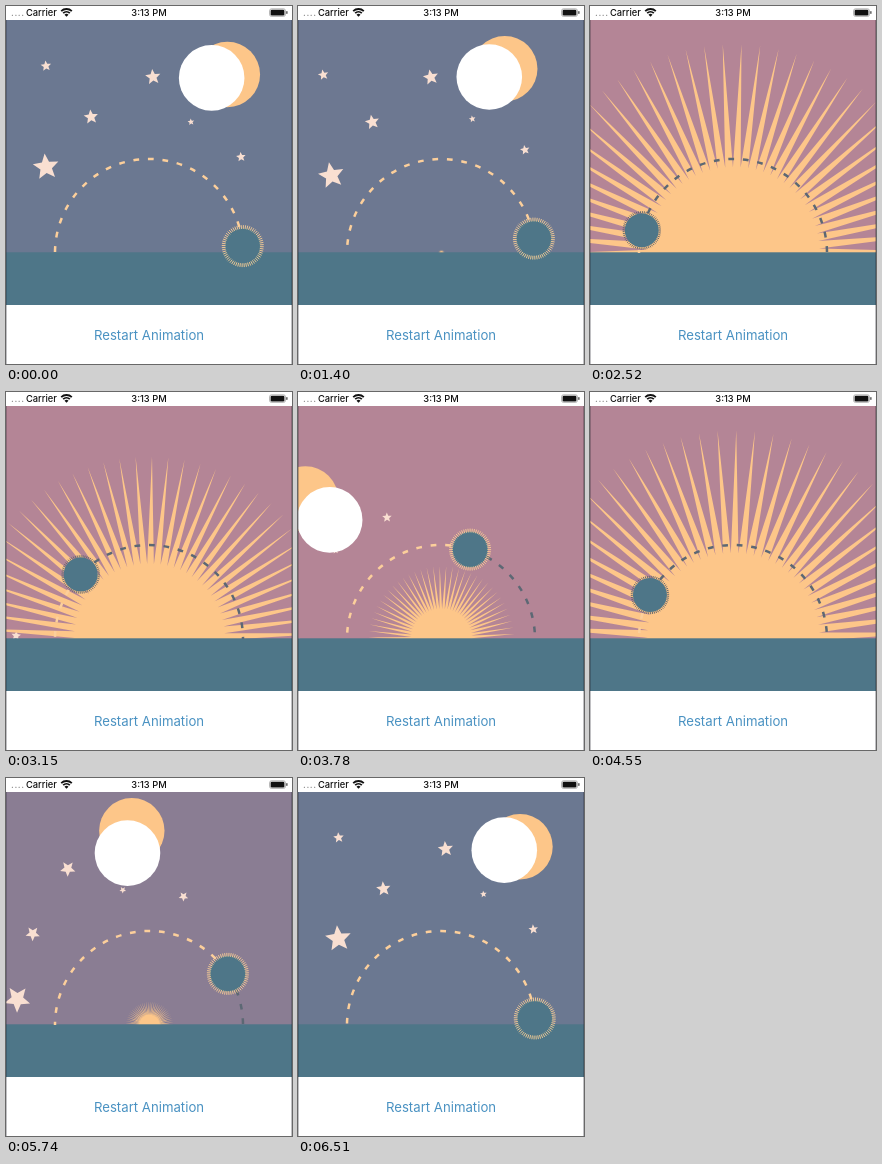
Recreate the animation shown at these times as an HTML page with a canvas. Size 286 by 358 pixels, loop 6580 ms.

```html
<!DOCTYPE html>
<html lang="en">
<head>
<meta charset="utf-8">
<title>Day and night</title>
<style>
  html, body { margin: 0; width: 100%; height: 100%; overflow: hidden; background: #fff; }
  canvas { position: absolute; left: 0; top: 0; width: 286px; height: 358px; }
  span { position: absolute; white-space: nowrap; font-family: Inter, Roboto, sans-serif; }
  .bar { top: 0; height: 13px; line-height: 13px; font-size: 9.3px; font-weight: 500; color: #111; }
  .signal { left: 5px; color: #888; letter-spacing: .6px; }
  .carrier { left: 20px; }
  .clock { left: 0; width: 286px; text-align: center; }
  .button { left: 0; top: 319px; width: 286px; line-height: 20px; text-align: center; font-size: 13.2px; color: #4a92c2; }
</style>
</head>
<body>
<canvas id="stage"></canvas>
<span class="bar signal">....</span>
<span class="bar carrier">Carrier</span>
<span class="bar clock">3:13 PM</span>
<span class="button">Restart Animation</span>
<script>
const W = 286, H = 358, LOOP = 6580, TAU = Math.PI * 2;
const CX = 143, CY = 247, ARC = 94;
const TEAL = '#4e7688', ORANGE = '#fdc689';
const canvas = document.getElementById('stage');
const ctx = canvas.getContext('2d');
const ratio = window.devicePixelRatio || 1;
canvas.width = W * ratio;
canvas.height = H * ratio;
ctx.scale(ratio, ratio);

// Knob angle in degrees over time; 0 is right (night), 180 is left (day).
const KEYS = [[0, 4.2], [700, 4.8], [1400, 8.8], [2520, 166], [2680, 171],
  [3780, 72], [3900, 69], [4550, 152], [4650, 156], [5110, 73.5],
  [5800, 30], [6300, 9], [6510, 4], [6580, 4]];

// Stars at rest: x, y, radius.
const REST = 4.2;
const STARS = [[40, 60, 5.5], [147, 71, 8], [85, 111, 7.5],
  [40, 161, 13.5], [235, 151, 5], [185, 116, 3.5]];

const rad = d => d * Math.PI / 180;
const clamp = (v, a = 0, b = 1) => Math.max(a, Math.min(b, v));
const mix = (a, b, k) => `rgb(${a.map((v, i) => Math.round(v + (b[i] - v) * k))})`;
const at = (r, deg) => [CX + r * Math.cos(rad(deg)), CY - r * Math.sin(rad(deg))];

function slope(i) {
  if (i < 1 || i > KEYS.length - 2) return 0;
  const [p, q, r] = [KEYS[i - 1], KEYS[i], KEYS[i + 1]];
  const a = (q[1] - p[1]) / (q[0] - p[0]);
  const b = (r[1] - q[1]) / (r[0] - q[0]);
  return a * b <= 0 ? 0 : 2 * a * b / (a + b);
}

function angleAt(t) {
  let i = 0;
  while (i < KEYS.length - 2 && t >= KEYS[i + 1][0]) i++;
  const [t0, a] = KEYS[i], [t1, b] = KEYS[i + 1];
  const h = t1 - t0, u = (t - t0) / h, e = u * u * (3 - 2 * u);
  return a + (b - a) * e + h * u * (1 - u) * ((1 - u) * slope(i) - u * slope(i + 1));
}

function disc(x, y, r, color) {
  ctx.fillStyle = color;
  ctx.beginPath();
  ctx.arc(x, y, r, 0, TAU);
  ctx.fill();
}

// Closed outline alternating between two radii.
function spikes(x, y, outer, inner, count, turn, color) {
  ctx.fillStyle = color;
  ctx.beginPath();
  for (let i = 0; i < count * 2; i++) {
    const r = i % 2 ? inner : outer;
    const a = turn + i * Math.PI / count;
    ctx.lineTo(x + r * Math.cos(a), y + r * Math.sin(a));
  }
  ctx.closePath();
  ctx.fill();
}

function drawStars(deg) {
  ctx.save();
  ctx.translate(CX, CY);
  ctx.rotate(-rad(deg - REST));
  for (const [x, y, r] of STARS) spikes(x - CX, y - CY, r, r * .45, 5, rad(-96), '#f9dfd1');
  ctx.restore();
}

function drawMoon(deg) {
  const a = rad(deg + 62.1), c = Math.cos(a), s = Math.sin(a);
  const k = clamp((deg - REST) / 68.5, 0, 1.5);
  const out = -9.5 - 22.7 * Math.pow(k, .7), side = 13 - 16 * k;
  const x = CX + 195 * c, y = CY - 195 * s;
  disc(x, y, 32.7, ORANGE);
  disc(x + out * c - side * s, y - out * s - side * c, 32.8, '#fff');
}

function drawSun(deg) {
  if (deg < 5) return;
  const r = 209 * Math.min(1, Math.pow(deg / 150, 1.43));
  spikes(CX + .5, CY, r, r * .41, 70, -rad(deg - 1.1), ORANGE);
}

// The dashes turn together with the knob.
function drawArc(deg) {
  const step = 8.87, half = 1.75;
  const first = ((177.6 + deg - REST) % step + step) % step - step;
  ctx.lineWidth = 2.5;
  for (let a = first; a < 180 + half; a += step) {
    const from = Math.max(0, a - half), to = Math.min(180, a + half);
    if (to <= from) continue;
    ctx.strokeStyle = a < deg ? '#5c6874' : '#fccf9b';
    ctx.beginPath();
    ctx.arc(CX, CY, ARC, -rad(from), -rad(to), true);
    ctx.stroke();
  }
}

function drawKnob(deg) {
  const [x, y] = at(ARC, deg);
  const day = clamp((deg - 90) / 50);
  const tip = 21 - 1.8 * day;
  disc(x, y, 18 - day, TEAL);
  ctx.strokeStyle = mix([250, 208, 150], [88, 96, 106], day);
  ctx.lineWidth = .9;
  ctx.beginPath();
  for (let i = 0; i < 60; i++) {
    const a = i * TAU / 60 - rad(deg), c = Math.cos(a), s = Math.sin(a);
    ctx.moveTo(x + 17.2 * c, y + 17.2 * s);
    ctx.lineTo(x + tip * c, y + tip * s);
  }
  ctx.stroke();
}

function drawStatus() {
  ctx.strokeStyle = '#111';
  ctx.lineWidth = 1.8;
  for (const r of [7.5, 4.7]) {
    ctx.beginPath();
    ctx.arc(60.5, 10.5, r, -Math.PI * .75, -Math.PI * .25);
    ctx.stroke();
  }
  ctx.fillStyle = '#111';
  ctx.beginPath();
  ctx.moveTo(60.5, 10.7);
  ctx.arc(60.5, 10.7, 2.8, -Math.PI * .75, -Math.PI * .25);
  ctx.fill();
  ctx.lineWidth = .6;
  ctx.strokeStyle = '#888';
  ctx.beginPath();
  ctx.roundRect(263.5, 2.8, 16, 7.6, 2);
  ctx.stroke();
  ctx.beginPath();
  ctx.roundRect(264.6, 3.8, 13.8, 5.6, 1.2);
  ctx.fill();
  ctx.fillRect(280.4, 5.2, 1, 2.6);
}

function draw(t) {
  const deg = angleAt(t);
  ctx.fillStyle = '#fff';
  ctx.fillRect(0, 0, W, H);
  ctx.save();
  ctx.beginPath();
  ctx.rect(0, 14, W, 285);
  ctx.clip();
  ctx.fillStyle = mix([107, 120, 145], [180, 133, 150], clamp((deg - 7) / 62));
  ctx.fillRect(0, 14, W, 233);
  drawStars(deg);
  drawMoon(deg);
  drawSun(deg);
  ctx.fillStyle = TEAL;
  ctx.fillRect(0, 246.3, W, 53);
  drawArc(deg);
  drawKnob(deg);
  ctx.restore();
  drawStatus();
  ctx.fillStyle = 'rgba(30,30,40,.35)';
  ctx.fillRect(0, 14, .8, H);
  ctx.fillRect(W - .8, 14, .8, H);
}

const start = performance.now();
function frame(now) {
  draw(Math.max(0, now - start) % LOOP);
  requestAnimationFrame(frame);
}
draw(0);
requestAnimationFrame(frame);
</script>
</body>
</html>
```
